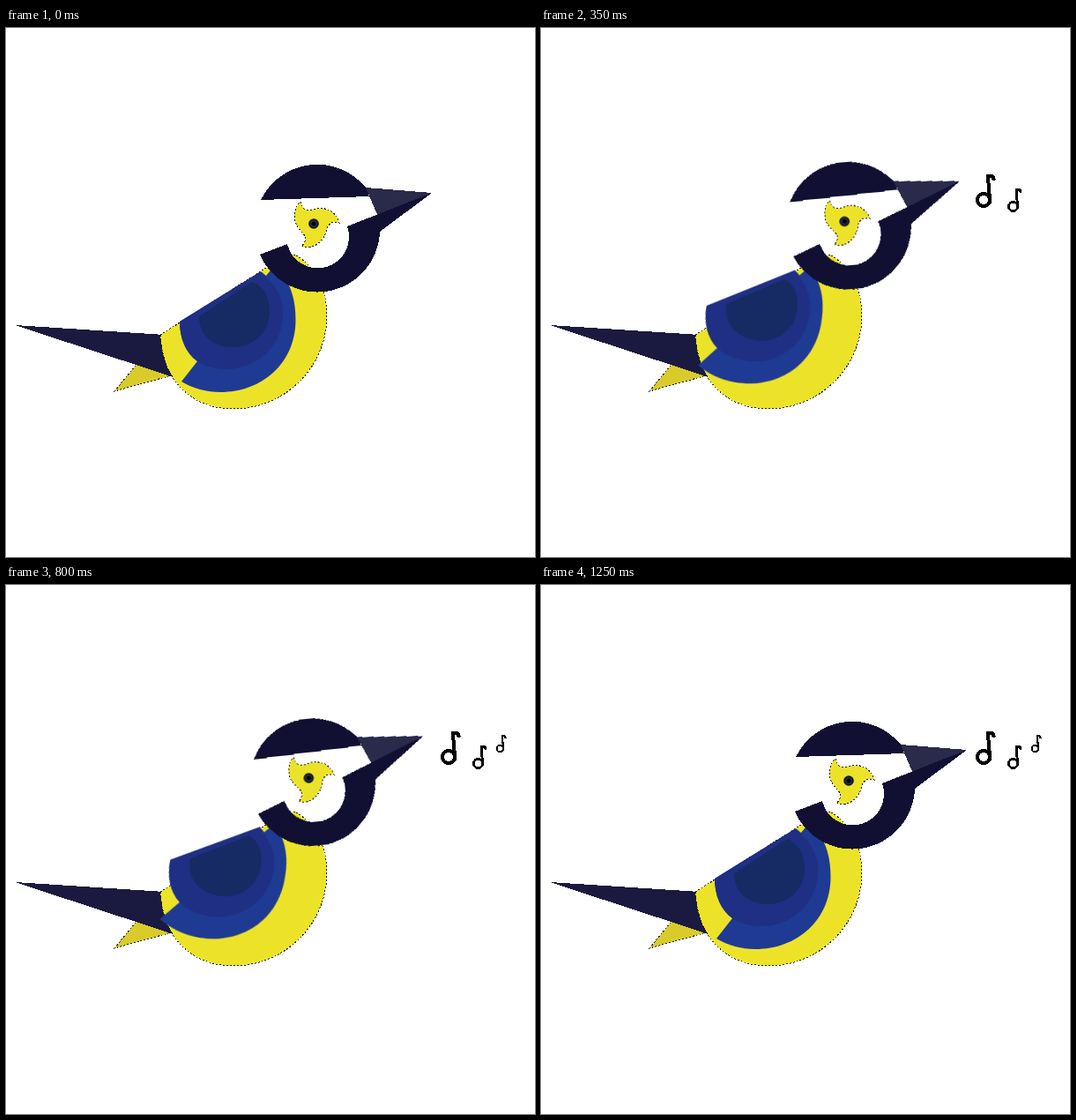
Recreate the animation shown at these times as an HTML page without scripts. Size 600x600 px, loop 1300 ms.

```html
<!DOCTYPE html>
<html lang="en">
<head>
<meta charset="utf-8">
<title>Singing bird</title>
<style>
  html, body { margin: 0; width: 100%; height: 100%; overflow: hidden; background: #fff; }
  svg { display: block; width: 100%; height: 100%; shape-rendering: crispEdges; }

  .navy { fill: #111033; }
  .yellow { fill: #ece329; }
  .edge { stroke: #222; stroke-width: 1; stroke-dasharray: 2 2; }
  .note { fill: none; stroke: #000; stroke-width: 4; stroke-linejoin: round; }
  .wing, .eye circle { shape-rendering: auto; }

  .head, .wing { animation: 1.3s infinite; }
  .head { transform-origin: 315px 279px; animation-name: nod; }
  .wing { transform-origin: 297px 270px; animation-name: lift; }

  /* 12 steps up, 13 steps back, one step of rest */
  @keyframes nod {
    0% { transform: rotate(0deg); animation-timing-function: steps(12, end); }
    46.1538% { transform: rotate(-8deg); animation-timing-function: steps(13, end); }
    96.1538%, 100% { transform: rotate(0deg); }
  }
  @keyframes lift {
    0% { transform: rotate(0deg); animation-timing-function: steps(12, end); }
    46.1538% { transform: rotate(16.7deg); animation-timing-function: steps(13, end); }
    96.1538%, 100% { transform: rotate(0deg); }
  }

  .first { animation: first 1.3s step-end infinite; }
  .second { animation: second 1.3s step-end infinite; }
  .third { animation: third 1.3s step-end infinite; }
  @keyframes first { 0% { visibility: hidden; } 7.692%, 100% { visibility: visible; } }
  @keyframes second { 0% { visibility: hidden; } 23.076%, 100% { visibility: visible; } }
  @keyframes third { 0% { visibility: hidden; } 38.461%, 100% { visibility: visible; } }
</style>
</head>
<body>
<svg viewBox="0 0 600 600">
  <defs>
    <g id="note" class="note">
      <circle r="7"/>
      <path d="M7.5 4L4.8-27L10.5-26.5L12-22"/>
    </g>
  </defs>

  <g class="tail">
    <path class="edge" fill="#d8cb2a" d="M123 412L160 367L188 394Z"/>
    <path fill="#1a1a40" d="M10 337L180 348L190 396Z"/>
  </g>

  <path class="body yellow edge" d="M175 348L303 267L328 257C350 270 364 297 364 325A106 106 0 0 1 258 432C215 432 178 405 175 348Z"/>

  <g class="wing">
    <path fill="#1f3a93" d="M197 333L289 276L295 281L304 270C322 284 329 308 328.5 332C328 380 291 413 243 413C228 413 212 409 199 401L217 378C204 369 197 352 197 333Z"/>
    <path fill="#1f2f84" d="M197 333L288 277C306 290 314 305 314 325C314 360 285 387 250 387C238 387 226 384 217 378C204 369 197 352 197 333Z"/>
    <path fill="#162a63" d="M219 327L279 288C292 293 299 305 299 322C299 345 280 362 258 362C236 362 219 350 219 327Z"/>
  </g>

  <g class="head">
    <path fill="#2a2a4a" d="M408 181L483 187L422 214Z"/>
    <path class="navy" d="M289 195A71 71 0 0 1 408 181L412 191Z"/>
    <path class="navy" d="M288 257L319 245A35.5 35.5 0 1 0 387 225L483 187L424 231A71 71 0 0 1 288 257Z"/>
    <g class="eye" transform="translate(349 222)">
      <path class="yellow edge" d="M-15-25C-13-17-9-14-2-16C14-21 26-13 29-1C21-3 17-1 15 6C11 23-2 29-14 25.5C-8 20-8 15-13 10C-25-2-24-16-15-25Z"/>
      <circle r="5.8" fill="#10131f"/>
      <circle r="4" fill="#1d3050"/>
      <circle r="2.5"/>
    </g>
  </g>

  <use class="first" href="#note" transform="translate(502 195)"/>
  <use class="second" href="#note" transform="translate(535.5 202.5) scale(.72)"/>
  <use class="third" href="#note" transform="translate(560.3 185.5) scale(.53)"/>
</svg>
</body>
</html>
```
